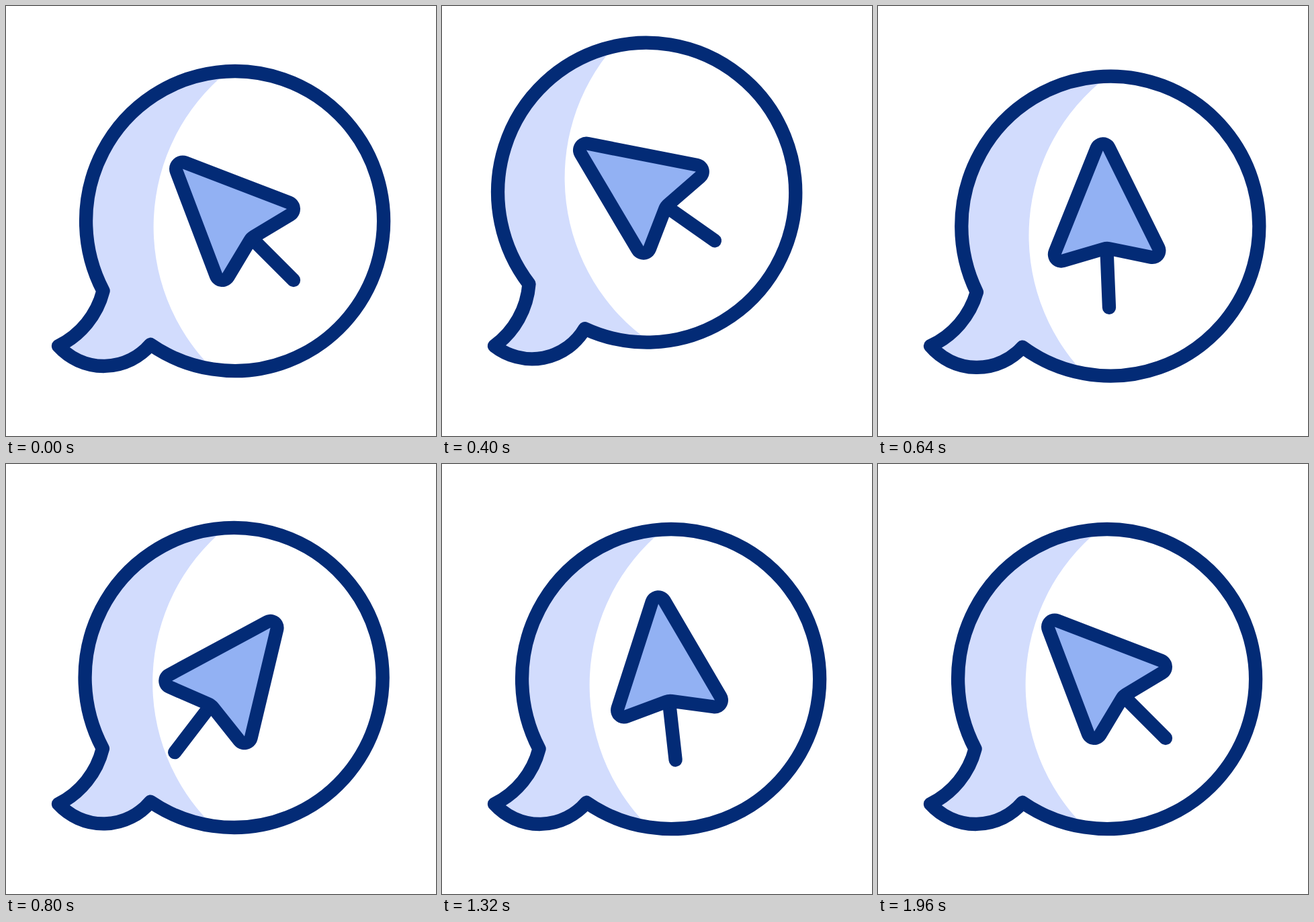
Write an HTML page that moves like this. It is 640x640 px and loops after 2 s.

```html
<!DOCTYPE html>
<html lang="en">
<head>
<meta charset="utf-8">
<title>Chat bubble cursor</title>
<style>
  html, body { margin: 0; width: 100%; height: 100%; overflow: hidden; background: #fff; }
  svg { display: block; width: 100vw; height: 100vh; }
  .line { fill: none; stroke: #032b76; stroke-width: 20.3; stroke-linecap: round; stroke-linejoin: round; }
</style>
</head>
<body>
<svg viewBox="0 0 640 640">
  <g id="bubble">
    <path fill="#d2dcfd" d="M215 503.75A221.5 223 0 0 0 308 540.6A298 298 0 0 1 330 97.25A221.5 223 0 0 0 144.6 424A126 126 0 0 1 78 506A91 91 0 0 0 215 503.75Z"/>
    <path class="line" d="M144.6 424A221.5 223 0 1 1 215 503.75A91 91 0 0 1 78 506A126 126 0 0 0 144.6 424Z"/>
    <g id="ring"><ellipse class="line" rx="45.8" ry="50.2" style="stroke-width:21.5"/></g>
    <g id="cursor">
      <path class="line" d="M365 345L428 408"/>
      <path class="line" style="stroke-width:40" d="M263 242.5L418 302L358 338L322 398Z"/>
      <path fill="#92b1f3" d="M263 242.5L418 302L364 334.5Q358 338 354.5 344L322 398Z"/>
    </g>
  </g>
</svg>
<script>
  const LOOP = 2000, STEP = 40;
  const [bubble, ring, cursor] = ['bubble', 'ring', 'cursor'].map(id => document.getElementById(id));

  // Bubble swing around the tail tip: [ms, degrees]
  const swing = [[90, 0], [280, 8.9], [420, -11], [575, 3.6], [725, -1.3], [850, 0]];
  // Cursor turn: 0 points left, 1 points right
  const turn = [[497, 0], [785, 1], [1170, 1], [1457, 0]];
  const clicks = [{ at: 875, x: 400.5, y: 241 }, { at: 1547, x: 252.5, y: 232.5 }];

  const clamp = v => Math.min(1, Math.max(0, v));
  const ease = v => { const s = clamp(v); return s * s * (3 - 2 * s); };

  function track(keys, t) {
    let value = keys[0][1];
    for (let i = 1; i < keys.length; i++) {
      const [from, a] = keys[i - 1], [to, b] = keys[i];
      value += (b - a) * ease((t - from) / (to - from));
    }
    return value;
  }

  function draw(t) {
    bubble.setAttribute('transform', `rotate(${track(swing, t)} 78 506)`);

    const k = track(turn, t);
    cursor.setAttribute('transform',
      `translate(${-59.4 * k} ${15.3 * k}) rotate(${82.9 * k} 365.5 345.5)`);

    const click = clicks.find(c => t > c.at && t < c.at + 220);
    ring.setAttribute('opacity', click ? 1 - clamp((t - click.at - 85) / 135) : 0);
    if (click) {
      const size = ease((t - click.at) / 125);
      ring.setAttribute('transform', `translate(${click.x} ${click.y}) scale(${size})`);
    }
  }

  const start = performance.now();
  function tick() {
    const t = (performance.now() - start) % LOOP;
    draw(Math.floor(t / STEP) * STEP);
    requestAnimationFrame(tick);
  }
  tick();
</script>
</body>
</html>
```
